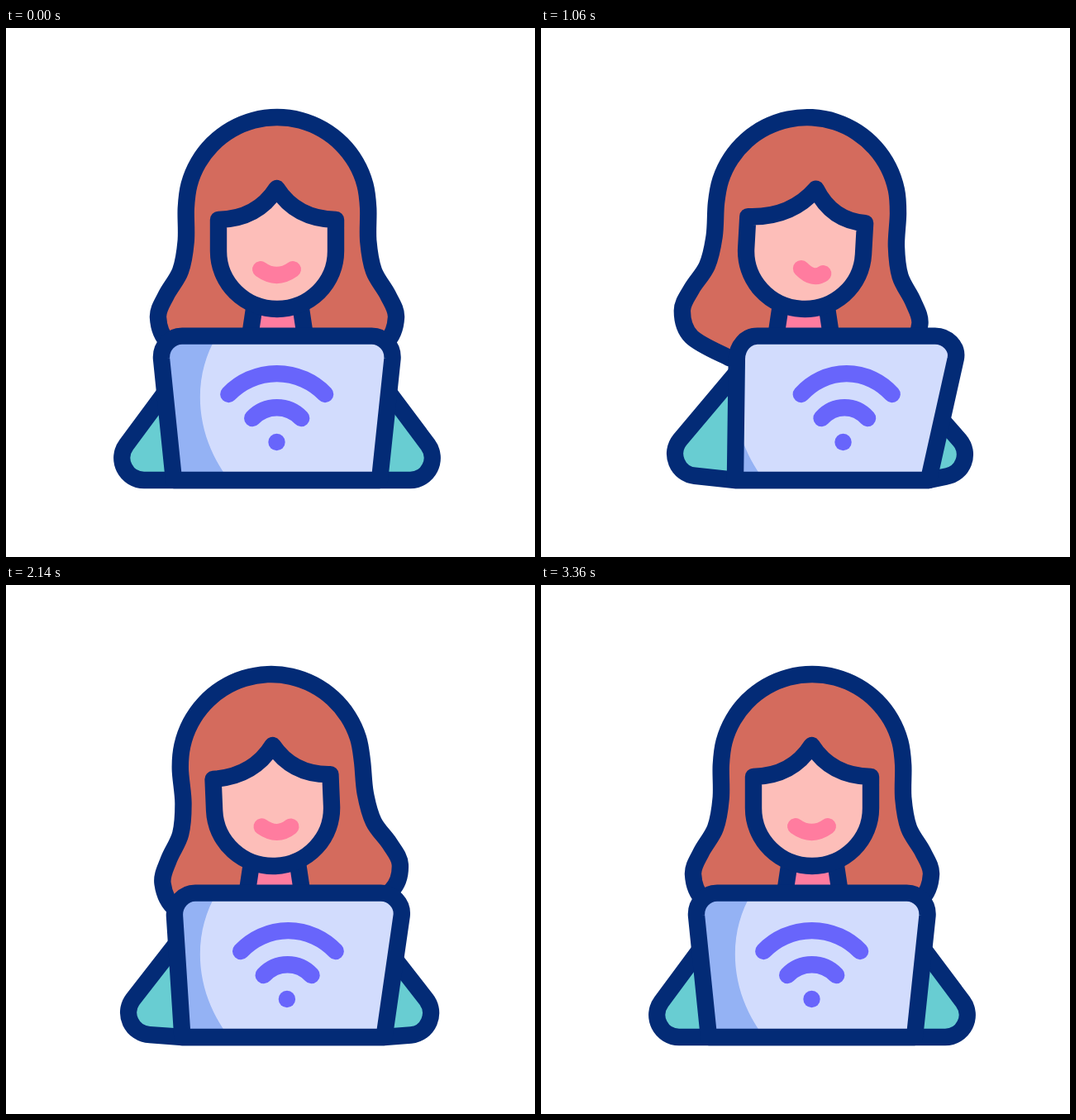
An HTML page for the animation above (3600 ms loop, 640 by 640 pixels).

```html
<!DOCTYPE html>
<html lang="en">
<head>
<meta charset="utf-8">
<title>Working on a laptop</title>
<style>
  html, body { margin: 0; width: 100%; height: 100%; overflow: hidden; background: #fff; }
  svg { display: block; width: 100vw; height: 100vh; }
  .line { stroke: #032b76; stroke-width: 20.4; stroke-linecap: round; stroke-linejoin: round; }
  .wifi { stroke: #6865fb; stroke-width: 20.4; stroke-linecap: round; fill: none; }
</style>
</head>
<body>
<svg viewBox="0 0 640 640" xmlns="http://www.w3.org/2000/svg">
  <defs><clipPath id="screen"><path id="screenClip"/></clipPath></defs>
  <path id="body" class="line" fill="#68cdd2"/>
  <path id="hair" class="line" fill="#d46b5d"/>
  <g id="neck">
    <path d="M300 335L295 375H362L357 335Z" fill="#ff7c9f"/>
    <path class="line" fill="none" d="M300 340L295.5 370M357 340L361.5 370"/>
  </g>
  <g id="head">
    <path id="face" class="line" fill="#fdbeb9"/>
    <path id="mouth" fill="none" stroke="#ff7c9f" stroke-width="20" stroke-linecap="round"/>
  </g>
  <path id="laptop" fill="#d2dcfd"/>
  <path clip-path="url(#screen)" fill="#94b2f4" d="M255 373C226 420 226 490 270 547H100V373Z"/>
  <path id="frame" class="line" fill="none"/>
  <path id="bigWave" class="wifi"/>
  <path id="smallWave" class="wifi"/>
  <circle id="dot" cy="501" r="10.2" fill="#6865fb"/>
</svg>
<script>
const LOOP = 3600;
const MID = 328;   // axis of the head
const BROW = 218;  // height where the hair leaves the round crown
const el = {};
document.querySelectorAll('[id]').forEach(n => el[n.id] = n);
const set = (id, value, name = 'd') => el[id].setAttribute(name, value);

const part = (t, a, b) => Math.min(1, Math.max(0, (t - a) / (b - a)));
const ease = (t, a, b) => (1 - Math.cos(Math.PI * part(t, a, b))) / 2;
const bump = (t, a, b) => Math.sin(Math.PI * part(t, a, b)) ** 2;

// The screen swings aside, settles a little further, then returns.
const turnAt = t => .926 * ease(t, 0, 800) + .074 * ease(t, 800, 1740) - ease(t, 1740, 2380);

// The head leans right, then left, then straightens.
const tiltAt = t => 3.2 * ease(t, 0, 560) - 6.2 * ease(t, 1060, 2420) + 3 * ease(t, 2460, 3000);
const nodAt = t => 5 * bump(t, 0, 800) + 1.5 * bump(t, 2140, 2780);

// Two shoulder lifts, then a longer one that sinks slowly.
const shrugAt = t => .75 * (bump(t, 0, 720) + bump(t, 720, 1400))
  + ease(t, 1400, 1740) - ease(t, 1740, 2460);

// The hair trails the head, then swings out and dies away.
function swayAt(t) {
  const u = part(t, 2460, 3360);
  if (u > 0) return 15 * (1 - u) * Math.cos(2.25 * Math.PI * u);
  return -8 * bump(t, 0, 800) - 5 * ease(t, 1060, 1740) + 20 * ease(t, 1740, 2460);
}

// One lock, a round crown, and the lock mirrored.
const lock = [[244, 404], [197, 381], [184, 350], [194, 323], [211, 294], [217.7, 258]];
const crown = Array.from({ length: 13 }, (_, i) => {
  const a = Math.PI * i / 12;
  return [MID - 110.2 * Math.cos(a), BROW - 110 * Math.sin(a)];
});
const mirrored = lock.map(([x, y]) => [2 * MID - x, y]).reverse();
const hairPoints = [...lock, ...crown, ...mirrored];

function spline(points) {
  const at = i => points[Math.min(points.length - 1, Math.max(0, i))];
  const handle = (i, dir) => at(i).map((v, axis) => v + dir * (at(i + 1)[axis] - at(i - 1)[axis]) / 6);
  return points.slice(1).reduce(
    (d, p, i) => `${d}C${handle(i, 1)} ${handle(i + 1, -1)} ${p}`, `M${points[0]}`);
}

function drawHair(sway) {
  set('hair', spline(hairPoints.map(([x, y]) => {
    const s = sway * Math.max(0, (y - BROW) / 132);
    return [x + s, y - (x - MID) / 180 * s];
  })));
}

function drawFace(k) {
  set('face', `M257 232V270A71 70 0 0 0 399 270V232`
    + `Q${351 + 8 * k} 231 ${327.5 + 10.5 * k} 194Q${304 + 5 * k} 231 257 232Z`);
  set('mouth', `M${308 + 18 * k} ${292 - k}Q${327.5 + 13.5 * k} ${306 - k} ${347 + 5 * k} ${292 + 4 * k}`);
}

function drawBody(k, s) {
  const shoulder = 'A26.8 26.8 0 0 0';
  set('body', `M${205 + 40 * k} ${424 - 15 * k}`
    + `L${145.6 + 20 * k + 5 * s} ${504.2 - 8 * s}`
    + `${shoulder} ${167 + 17 * k + 4 * s} ${547 - 7 * s}`
    + `L${203 + 34 * k} 547H${452 + 18 * k}`
    + `L${489 + 2 * s} ${547 - 6 * s}`
    + `${shoulder} ${510.4 - 5 * s} ${504.2 - 7 * s}`
    + `L${455 + 10 * k} ${430 + 22 * k}Z`);
}

function drawLaptop(k) {
  const l = 188 + 52 * k, r = 467.5 + 36.5 * k;
  const d = `M${203 + 34 * k} 547L${l} 400`
    + `C${l - 1 + 1.5 * k} 385 ${l + 11} 372.6 ${l + 25} 372.6H${r - 25}`
    + `C${r - 11} 372.6 ${r + 1 + 2 * k} 385 ${r} 400L${452 + 18 * k} 547Z`;
  ['laptop', 'frame', 'screenClip'].forEach(id => set(id, d));
}

// An arc that narrows slightly as the screen turns.
function drawWave(id, k, half, y, height) {
  const w = half - k * half * .063, x = 327.7 + k * (39.5 + half * .09);
  set(id, `M${x - w} ${y}A${w * 1.38} ${height} 0 0 1 ${x + w} ${y}`);
}

function draw(t) {
  const k = turnAt(t);
  const lean = `translate(${-11.5 * k} ${nodAt(t)}) rotate(${tiltAt(t)} ${MID} 304)`;
  set('hair', lean, 'transform');
  set('head', lean, 'transform');
  set('neck', `translate(${-11.5 * k})`, 'transform');
  drawHair(swayAt(t));
  drawFace(k);
  drawBody(k, shrugAt(t));
  drawLaptop(k);
  drawWave('bigWave', k, 58.4, 443, 80);
  drawWave('smallWave', k, 29.5, 472, 41);
  set('dot', 327.5 + 40.5 * k, 'cx');
}

const start = performance.now();
function tick() {
  draw((performance.now() - start) % LOOP);
  requestAnimationFrame(tick);
}
tick();
</script>
</body>
</html>
```
